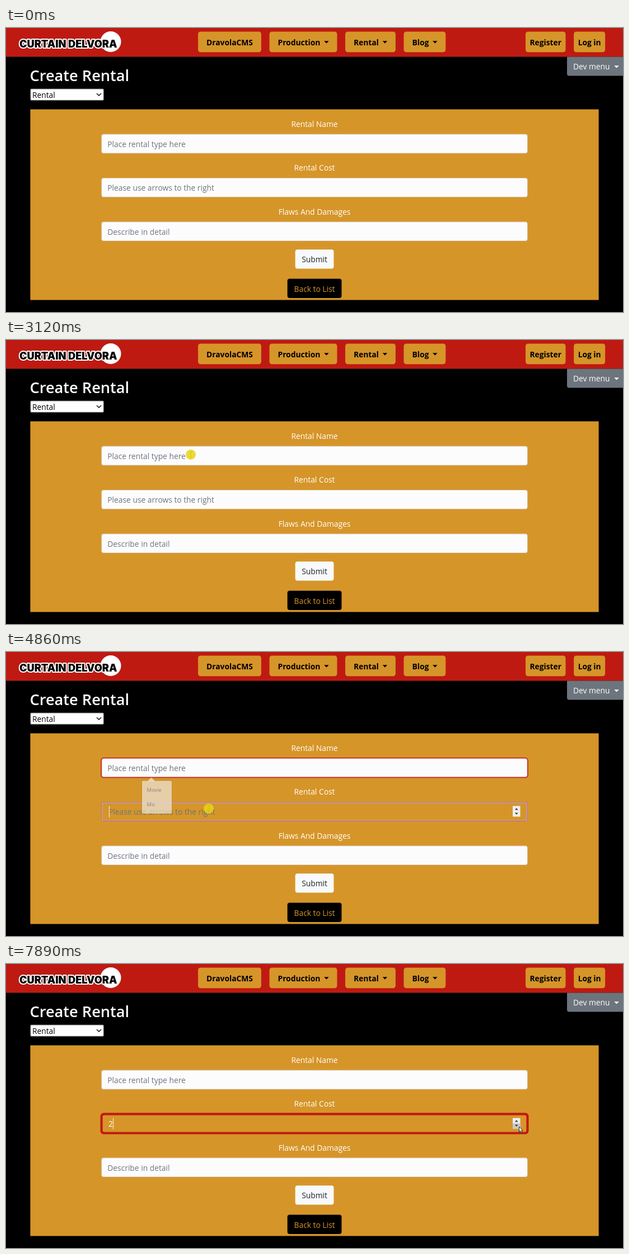
Animation of 1102x508 px, one loop 8 s. Source, as an HTML page with a canvas:

```html
<!DOCTYPE html>
<html lang="en">
<head>
<meta charset="utf-8">
<title>Create Rental</title>
<style>
  html, body { margin: 0; width: 100%; height: 100%; overflow: hidden; background: #000; }
  canvas { display: block; }
</style>
</head>
<body>
<canvas id="stage" width="1102" height="508"></canvas>
<script>
const ctx = document.getElementById('stage').getContext('2d');
const LOOP = 8000, W = 1102, H = 508, MID = W / 2;
const RED = '#bf1a12', GOLD = '#d69529', GRAY = '#6c757d', PAPER = '#fdfcfd';
const SANS = '"Open Sans", "Noto Sans", sans-serif';
const BODY = '13.8px ' + SANS, BOLD = '700 ' + BODY;
const FIELD = { x: 170.4, w: 761.2, h: 34.4 };
const FADE = 180, BLINK = 530, FLASH = 80;

// The first two clicks focus a field, the others step the number
const CLICKS = [3120, 4790, 6680, 6850, 7090, 7620];
const VALUES = ['', '', '1', '2', '3', '2'];
const [FOCUS_NAME, FOCUS_COST] = CLICKS.map(t => t + 30);

// Each move eases out to its end point, bent towards "via"
const ENTER = [980, 502];
const MOVES = [
  { from: 430, until: 1170, to: [653, 422] },
  { from: 1230, until: 1990, to: [251, 253] },
  { from: 2310, until: 2800, to: [330, 205] },
  { from: 3970, until: 4520, to: [362, 280], via: [365, 375] },
  { from: 5320, until: 6090, to: [915, 283], via: [310, 466] },
  { from: 6140, until: 6480, to: [907, 282] },
  { from: 7190, until: 7420, to: [916.5, 291] }
];

const FIELDS = [
  ['Rental Name', 'Place rental type here'],
  ['Rental Cost', 'Please use arrows to the right'],
  ['Flaws And Damages', 'Describe in detail']
];
const fieldY = i => 189.8 + 78.4 * i;
const ramp = (t, start, span) => Math.max(0, Math.min(1, (t - start) / span));

function box(x, y, w, h, r, fill) {
  ctx.beginPath();
  ctx.roundRect(x, y, w, h, r);
  ctx.fillStyle = fill;
  ctx.fill();
}

function text(str, x, y, color, font = BODY, align = 'left') {
  ctx.font = font;
  ctx.textAlign = align;
  ctx.fillStyle = color;
  ctx.fillText(str, x, y);
}

function line(points, color, width) {
  ctx.beginPath();
  points.forEach(([x, y]) => ctx.lineTo(x, y));
  ctx.strokeStyle = color;
  ctx.lineWidth = width;
  ctx.stroke();
}

// Triangle with its base at y and its tip at y + h
function triangle(x, y, w, h, fill) {
  ctx.beginPath();
  ctx.moveTo(x - w / 2, y);
  ctx.lineTo(x + w / 2, y);
  ctx.lineTo(x, y + h);
  ctx.fillStyle = fill;
  ctx.fill();
}

function disc(x, y, r, fill) {
  ctx.beginPath();
  ctx.arc(x, y, r, 0, Math.PI * 2);
  ctx.fillStyle = fill;
  ctx.fill();
}

const mix = (a, b, k) => `rgb(${a.map((v, i) => Math.round(v + (b[i] - v) * k))})`;

function pointerAt(t) {
  if (t < MOVES[0].from) return null;
  let pos = ENTER;
  for (const { from, until, to, via } of MOVES) {
    if (t < from) break;
    const k = Math.sin(ramp(t, from, until - from) * Math.PI / 2);
    pos = pos.map((a, i) => {
      const mid = via ? via[i] : (a + to[i]) / 2;
      return a * (1 - k) ** 2 + 2 * mid * k * (1 - k) + to[i] * k * k;
    });
  }
  return pos;
}

// Row of header buttons sized by their labels
function navRow(x, pad, labels, menus) {
  for (const label of labels) {
    ctx.font = BOLD;
    const menu = menus.includes(label);
    const w = ctx.measureText(label).width + 2 * pad + (menu ? 15 : 0);
    box(x, 6.5, w, 36.7, 4.5, GOLD);
    text(label, x + pad, 31, '#000', BOLD);
    if (menu) triangle(x + w - 19, 23.3, 8.5, 4.3, '#000');
    x += w + 14.6;
  }
}

function drawHeader() {
  box(0, 0, W, 51.5, 0, RED);
  disc(187, 24.5, 18.5, '#fff');
  const name = 'CURTAIN DELVORA', font = '900 18.2px Inter, sans-serif';
  ctx.font = font;
  ctx.textAlign = 'left';
  ctx.lineJoin = 'round';
  ctx.lineWidth = 4;
  ctx.strokeStyle = '#fff';
  ctx.strokeText(name, 24, 35);
  text(name, 24, 35, '#000', font);

  navRow(343, 15, ['DravolaCMS', 'Production', 'Rental', 'Blog'], ['Production', 'Rental', 'Blog']);
  navRow(928, 7.5, ['Register', 'Log in'], []);
  box(1002, 51.5, 100, 34, [0, 0, 0, 4], GRAY);
  text('Dev menu', 1013, 74, '#fff');
  triangle(1090.5, 67.3, 8.5, 4.3, '#fff');
}

function drawPage() {
  text('Create Rental', 42.5, 95, '#fff', '600 27.2px ' + SANS);
  box(43.3, 108.5, 131.5, 21.3, 2, '#767676');
  box(44.3, 109.5, 129.5, 19.3, 1, '#fff');
  text('Rental', 47, 125, '#000');
  line([[162, 117], [166, 121], [170, 117]], '#111', 1.6);

  box(43.4, 145.4, W - 86.8, 341.2, 0, GOLD);
  box(MID - 34.4, 396.2, 68.8, 34.2, 4, '#f8f9fa');
  text('Submit', MID, 419, '#212529', BODY, 'center');
  box(MID - 48.4, 448.4, 96.8, 34.6, 4, '#000');
  text('Back to List', MID, 472, GOLD, BODY, 'center');
}

function drawSpinner(pointer) {
  const x = 905, y = 275.5, w = 13.5, half = 9.5, mid = y + half;
  box(x, y, w, 2 * half, 0, '#efefef');
  if (pointer && pointer[0] >= x && pointer[0] <= x + w) {
    box(x, pointer[1] < mid ? y : mid, w, half, 0, '#c9c9c9');
  }
  triangle(x + w / 2, mid - 2.5, 6, -3.5, '#444');
  triangle(x + w / 2, mid + 2.5, 6, 3.5, '#444');
}

function drawField(i, { value = '', focused = false, glow = 0, caret = false }) {
  const { x, w, h } = FIELD, y = fieldY(i), [label, hint] = FIELDS[i];
  text(label, MID, y - 12.8, '#fff', BODY, 'center');
  const ring = (grow, r, fill) => box(x - grow, y - grow, w + 2 * grow, h + 2 * grow, r, fill);
  const rest = focused ? [196, 164, 176] : [222, 219, 217];
  const border = focused ? 2.2 : 0.9;
  if (glow > 0) ring(1.9 * glow, 4 + 1.9 * glow, RED);
  ring(0, 4, mix(rest, [191, 26, 18], glow));
  ring(-border, 4 - border / 2, focused ? GOLD : PAPER);
  text(value || hint, focused ? 183 : 181.3, y + 23.2, value ? '#fff' : GRAY);
  if (focused && caret) box(value ? 191 : 184, y + 7.5, 1, 20, 0, '#fff6dc');
}

function drawPopup(alpha) {
  if (alpha <= 0) return;
  ctx.save();
  ctx.globalAlpha = alpha;
  ctx.shadowColor = 'rgba(0,0,0,.18)';
  ctx.shadowBlur = 3;
  box(243, 230.5, 53, 58.5, 2, '#fff');
  ctx.shadowColor = 'transparent';
  triangle(259.5, 231, 13, -6.5, '#fff');
  ['Movie', 'Mic'].forEach((word, i) =>
    text(word, 251.5, 250 + 26 * i, '#555', '9.3px ' + SANS));
  ctx.restore();
}

function drawBeam(x, y) {
  const color = 'rgba(50,55,60,.7)';
  line([[x, y - 5], [x, y + 5]], color, 1);
  for (const end of [y - 5, y + 5]) line([[x - 2.5, end], [x + 2.5, end]], color, 1);
}

function drawArrow(x, y) {
  const shape = new Path2D('M0 0V9.5L2.2 7.6 3.8 11 5.4 10.3 3.9 7 6.7 6.8Z');
  ctx.save();
  ctx.translate(x, y);
  ctx.fillStyle = '#fff';
  ctx.fill(shape);
  ctx.strokeStyle = '#222';
  ctx.lineWidth = 1;
  ctx.stroke(shape);
  ctx.restore();
}

function draw(t) {
  const pointer = pointerAt(t);
  const over = i => pointer && Math.abs(pointer[0] - MID) < FIELD.w / 2 &&
    pointer[1] >= fieldY(i) && pointer[1] <= fieldY(i) + FIELD.h;
  const last = CLICKS.filter(at => at <= t).length - 1;
  const sinceClick = t - CLICKS[last];
  const caret = Math.floor(sinceClick / BLINK) % 2 === 0;
  const costFocus = t >= FOCUS_COST;
  const nameFocus = t >= FOCUS_NAME && !costFocus;

  ctx.fillStyle = '#000';
  ctx.fillRect(0, 0, W, H);
  drawHeader();
  drawPage();
  drawField(0, {
    focused: nameFocus, caret,
    glow: ramp(t, FOCUS_NAME, FADE) * (1 - ramp(t, CLICKS[1], FADE))
  });
  drawField(1, {
    focused: costFocus, caret, value: VALUES[last],
    glow: ramp(t, FOCUS_COST + 30, FADE)
  });
  drawField(2, {});
  if (costFocus || over(1)) drawSpinner(pointer);
  drawPopup(ramp(t, FOCUS_NAME + 30, FADE) * (1 - ramp(t, CLICKS[1], FADE)));

  if (!pointer) return;
  const inText = pointer[0] < 905 && FIELDS.some((_, i) => over(i));
  (inText ? drawBeam : drawArrow)(...pointer);
  if (sinceClick < FLASH) disc(...pointer, 9, 'rgba(232,212,20,.85)');
}

const start = performance.now();
function tick() {
  draw((performance.now() - start) % LOOP);
  requestAnimationFrame(tick);
}
tick();
</script>
</body>
</html>
```
